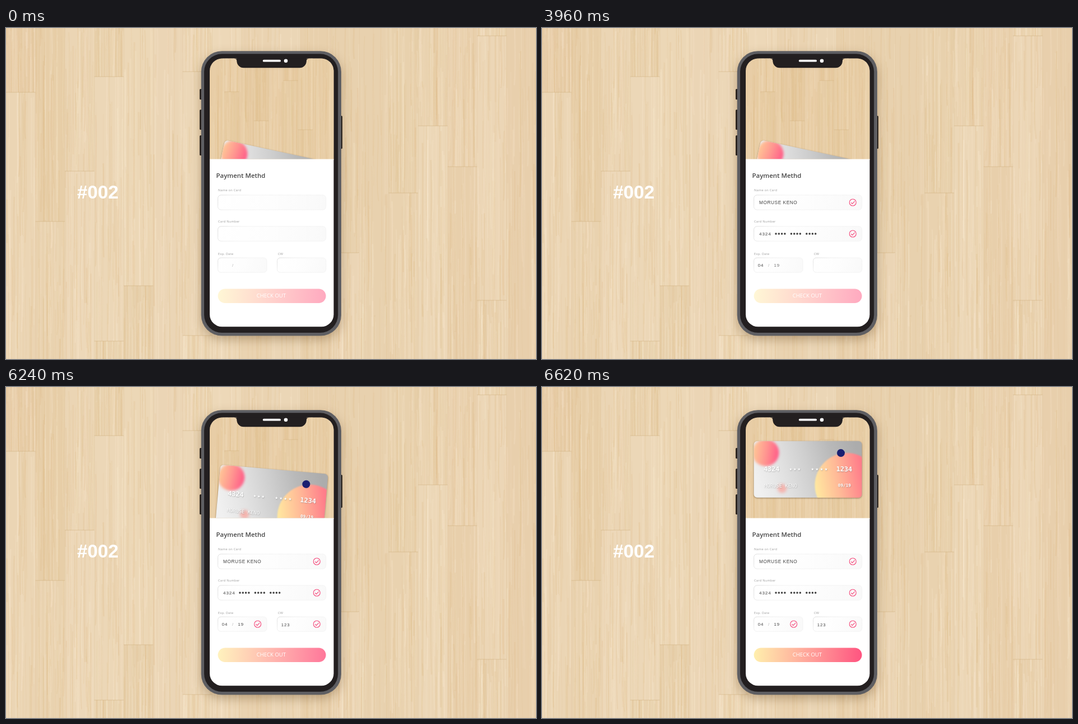
Recreate the animation shown at these times as an HTML page with a canvas. Size 947 px wide and 592 px high, loop 8.72 s.

```html
<!DOCTYPE html>
<html lang="en">
<head>
<meta charset="utf-8">
<title>Payment form</title>
<style>
  html, body { margin: 0; width: 100%; height: 100%; overflow: hidden; background: #ead4b3; }
  canvas { display: block; width: 947px; height: 592px; }
</style>
</head>
<body>
<canvas id="stage" width="947" height="592"></canvas>
<script>
const W = 947, H = 592, LOOP = 8720;
const stage = document.getElementById('stage').getContext('2d');
const SANS = '"Open Sans", "Noto Sans", sans-serif';
const ARIAL = '"Liberation Sans", Arial, sans-serif';
const MONO = '"DejaVu Sans Mono", monospace';
const HOLDER = 'MORUSE KENO';
const PINK = '#f5487a';

function layer(draw) {
  const canvas = document.createElement('canvas');
  canvas.width = W;
  canvas.height = H;
  draw(canvas.getContext('2d'));
  return canvas;
}

function random(seed) {
  return () => {
    seed = (seed * 1664525 + 1013904223) >>> 0;
    return seed / 4294967296;
  };
}

function box(c, x, y, w, h, r, fill) {
  c.beginPath();
  c.roundRect(x, y, w, h, r);
  if (fill) {
    c.fillStyle = fill;
    c.fill();
  }
}

function disc(c, x, y, r, fill) {
  c.beginPath();
  c.arc(x, y, r, 0, Math.PI * 2);
  c.fillStyle = fill;
  c.fill();
}

function text(c, str, x, y, font, fill, spacing = 0) {
  c.font = font;
  c.fillStyle = fill;
  c.letterSpacing = spacing + 'px';
  c.fillText(str, x, y);
}

function ramp(c, x0, y0, x1, y1, ...colors) {
  const g = c.createLinearGradient(x0, y0, x1, y1);
  colors.forEach((color, i) => g.addColorStop(i / (colors.length - 1), color));
  return g;
}

// Vertical planks with wavy grain; seams lists [column, y] of board ends.
function wood(c, w, h, plank, seed, seams) {
  const rnd = random(seed);
  c.fillStyle = '#ead4b3';
  c.fillRect(0, 0, w, h);
  for (let col = 0; col * plank < w; col++) {
    const ends = seams.filter(s => s[0] === col).map(s => s[1]);
    const edges = [0, ...ends, h];
    for (let i = 0; i + 1 < edges.length; i++) {
      const x = col * plank, y = edges[i], len = edges[i + 1] - y;
      c.save();
      c.beginPath();
      c.rect(x, y, plank, len);
      c.clip();
      c.fillStyle = rnd() < .5
        ? `rgba(222,190,142,${rnd() * .28})`
        : `rgba(242,224,196,${rnd() * .4})`;
      c.fillRect(x, y, plank, len);
      for (let n = 0; n < plank * 1.1; n++) {
        const gx = x + rnd() * plank, top = y - 60 + rnd() * len;
        const run = 60 + rnd() * 260, sway = (rnd() - .5) * 9;
        c.beginPath();
        c.moveTo(gx, top);
        c.bezierCurveTo(gx + sway, top + run * .3, gx - sway, top + run * .7, gx + sway * .4, top + run);
        c.lineWidth = .6 + rnd() * 2.6;
        c.strokeStyle = rnd() < .52
          ? `rgba(216,180,126,${.06 + rnd() * .16})`
          : `rgba(246,230,205,${.08 + rnd() * .22})`;
        c.stroke();
      }
      c.restore();
      if (i) {
        c.fillStyle = 'rgba(196,160,108,.4)';
        c.fillRect(x, y - .5, plank, 1);
      }
      c.fillStyle = 'rgba(202,168,118,.16)';
      c.fillRect(x, y, .8, len);
    }
  }
}

const back = layer(c => {
  wood(c, W, H, 52.6, 7, [
    [0, 115], [1, 346], [2, 256], [3, 87], [3, 560], [4, 461], [6, 78], [6, 550],
    [11, 402], [13, 295], [14, 175], [15, 248], [16, 14], [16, 487]
  ]);
  text(c, '#002', 127, 305, `bold 33.3px ${ARIAL}`, '#fff');

  for (const [y, h] of [[109, 19], [146, 36], [192, 36]]) box(c, 346, y, 5, h, 1.5, '#1b191a');
  box(c, 596, 157, 5, 59, 1.5, '#1b191a');
  c.save();
  c.shadowColor = 'rgba(110,78,40,.38)';
  c.shadowBlur = 18;
  c.shadowOffsetY = 7;
  box(c, 348.7, 41.3, 250.3, 509.2, 37, '#5e5e62');
  c.restore();
  box(c, 354, 46.3, 239.2, 498.8, 32, '#231f20');

  c.save();
  box(c, 364, 54.6, 221.5, 479.7, 22);
  c.clip();
  c.translate(364, 54);
  wood(c, 222, 182, 26.3, 31, [[1, 60], [3, 112], [5, 40], [6, 128]]);
  c.fillStyle = 'rgba(222,188,134,.28)';
  c.fillRect(0, 0, 222, 182);
  c.restore();
});

function field(c, x, y, w, h) {
  box(c, x, y, w, h, 5.5, ramp(c, x, y, x + w, y + h, '#ffffff', '#fdfdfd', '#f9f9f9'));
  c.lineWidth = .9;
  c.strokeStyle = ramp(c, x, y, x + w * .2, y + h, '#d9d9d9', '#ebebeb', '#f2f2f2');
  c.stroke();
}

const front = layer(c => {
  box(c, 364, 234.6, 221.5, 299.7, [0, 0, 22, 22], '#fff');
  text(c, 'Payment Methd', 375.6, 268, `600 11.4px ${SANS}`, '#444');
  const label = (str, x, y) => text(c, str, x, y, `5.6px ${SANS}`, '#999', .3);
  label('Name on Card', 379, 292.3);
  label('Card Number', 379, 348);
  label('Exp. Date', 379, 405.8);
  label('CW', 486, 405.8);
  field(c, 378.6, 298.8, 193, 26.4);
  field(c, 378.6, 354.8, 193, 26.4);
  field(c, 378.6, 411, 87.4, 26.2);
  field(c, 484.6, 411, 87.2, 26.2);
  text(c, '/', 404, 426.8, `7.8px ${ARIAL}`, '#b5b5b5');

  box(c, 412.5, 50, 124.3, 21.3, [0, 0, 12, 12], '#231f20');
  c.beginPath();
  c.moveTo(407.5, 54.4);
  c.quadraticCurveTo(412.7, 54.6, 412.7, 60);
  c.lineTo(536.6, 60);
  c.quadraticCurveTo(536.6, 54.6, 541.8, 54.4);
  c.fill();
  box(c, 458.8, 56.8, 32.2, 3.8, 1.9, '#fff');
  disc(c, 500, 58.7, 3.3, '#fff');
});

function ease(t, start, span) {
  const p = Math.min(1, Math.max(0, (t - start) / span));
  return Math.sin(p * Math.PI / 2);
}

function fade(c, alpha, draw) {
  if (alpha <= 0) return;
  c.save();
  c.globalAlpha = alpha;
  draw();
  c.restore();
}

// Card face, drawn around its own centre.
function card(c, p) {
  c.save();
  c.beginPath();
  c.rect(364, 54.6, 221.5, 180);
  c.clip();
  c.translate(475, 270 + (146.8 - 270) * p);
  c.rotate(12.2 * (1 - p) * Math.PI / 180);
  c.translate(-475, -146.8);

  c.save();
  c.shadowColor = 'rgba(70,50,25,.5)';
  c.shadowBlur = 3;
  c.shadowOffsetY = 1;
  box(c, 378.5, 96.2, 193, 101.2, 6,
    ramp(c, 385, 170, 565, 115, '#f0f0f0', '#e2e2e2', '#cfcfcf', '#b9b9b9', '#acacac'));
  c.restore();

  c.save();
  c.clip();
  c.filter = 'blur(2px)';
  disc(c, 399.5, 117, 24, ramp(c, 378, 113, 423, 119, '#ffc596', '#ff9590', '#ff5c88'));
  c.filter = 'blur(1px)';
  disc(c, 545, 175, 57.5, ramp(c, 488, 180, 574, 164, '#ffe9a0', '#ffb897', '#ff7d8a'));
  c.filter = 'blur(2.5px)';
  disc(c, 429, 181, 8, 'rgba(255,150,140,.6)');
  c.restore();

  disc(c, 534, 117.5, 7, '#1a1f71');

  c.save();
  c.shadowColor = 'rgba(90,90,90,.45)';
  c.shadowBlur = 1.5;
  c.shadowOffsetX = .5;
  c.shadowOffsetY = .8;
  text(c, '4324', 396, 150.3, `bold 11.8px ${MONO}`, '#fff');
  text(c, '1234', 525.8, 150.3, `bold 11.8px ${MONO}`, '#fff');
  const star = x => text(c, '★', x - 3, 149, '7px "DejaVu Sans", sans-serif', '#fff');
  for (let i = 0; i < 3; i++) star(444.2 + i * 7.5);
  for (let i = 0; i < 4; i++) star(483.2 + i * 8.1);
  text(c, HOLDER, 397, 179.3, `8.9px ${MONO}`, '#fff');
  text(c, '09/19', 528.8, 178, `bold 7.7px ${MONO}`, '#fff');
  c.restore();
  c.restore();
}

function entry(c, t, start, draw) {
  fade(c, ease(t, start, 480), draw);
}

function tick(c, t, start, x, y) {
  fade(c, ease(t, start, 400), () => {
    c.strokeStyle = PINK;
    c.lineWidth = 1.1;
    c.beginPath();
    c.arc(x, y, 6, 0, Math.PI * 2);
    c.moveTo(x - 3.3, y + .1);
    c.lineTo(x - .9, y + 2.4);
    c.lineTo(x + 3.5, y - 2.1);
    c.stroke();
  });
}

function render(t) {
  const c = stage;
  const p = ease(t, 5962, 700);
  c.drawImage(back, 0, 0);
  card(c, p);
  c.drawImage(front, 0, 0);

  fade(c, .5 + .5 * p, () =>
    box(c, 378.6, 466.4, 193, 25.6, 12.8, ramp(c, 380, 475, 571, 483, '#ffeeac', '#ffa49a', '#ff5480')));
  text(c, 'CHECK OUT', 447.8, 481.6, `9.5px ${SANS}`, '#fff');

  const type = (str, x, y, size, gap) => text(c, str, x, y, `${size}px ${ARIAL}`, '#444', gap);
  entry(c, t, 662, () => type(HOLDER, 388, 315.2, 8.3, .55));
  entry(c, t, 1770, () => {
    type('4324', 388, 371, 8.1, .9);
    for (let i = 0; i < 12; i++) disc(c, 418 + (i >> 2) * 27.4 + (i & 3) * 5.3, 368, 1.75, '#3c3c3c');
  });
  entry(c, t, 2942, () => type('04', 385.8, 427, 7.8, .9));
  entry(c, t, 3702, () => type('19', 414.6, 427, 7.8, .9));
  entry(c, t, 4762, () => type('123', 491.8, 427.6, 7.8, .9));

  tick(c, t, 1265, 555.3, 312);
  tick(c, t, 2465, 555.3, 368);
  tick(c, t, 4265, 449.7, 424);
  tick(c, t, 5465, 555.3, 424);
}

const begin = performance.now();
function play() {
  render((performance.now() - begin) % LOOP);
  requestAnimationFrame(play);
}
play();
</script>
</body>
</html>
```
